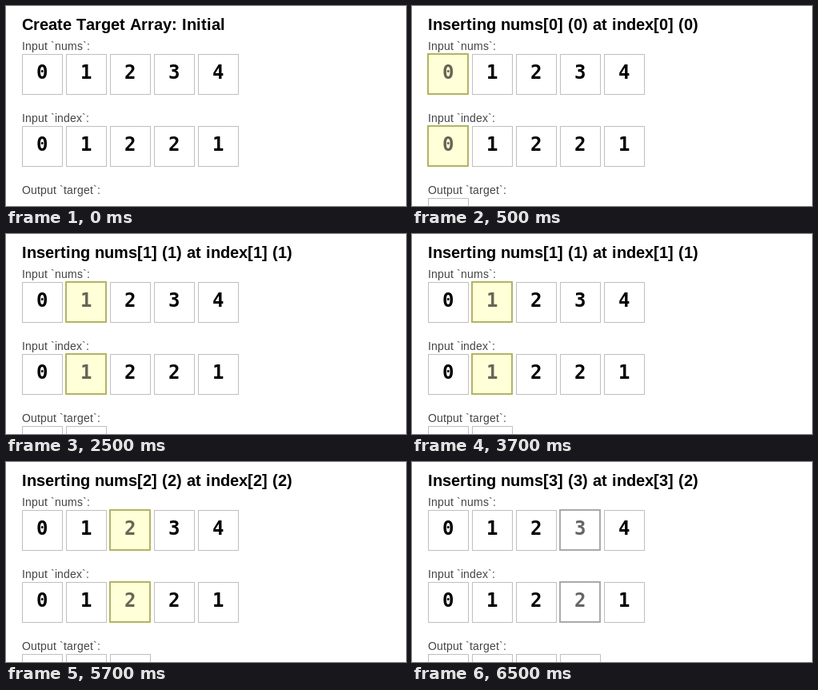
An HTML page with a canvas that plays this animation: 500 by 250 pixels, repeating every 8000 ms.

```html
<!DOCTYPE html>
<html lang="en">
<head>
<meta charset="utf-8">
<title>Create Target Array</title>
<style>
html, body { margin: 0; width: 100%; height: 100%; overflow: hidden; background: #fff; }
canvas { display: block; }
</style>
</head>
<body>
<canvas id="stage" width="500" height="250"></canvas>
<script>
const ctx = document.getElementById('stage').getContext('2d');
const SANS = '"Liberation Sans", Arial, sans-serif';
const MONO = '"DejaVu Sans Mono", monospace';
const LOOP = 8000, FIRST = 500, STEP = 2000;
const LEFT = 20, SIZE = 50, PITCH = 55;
const nums = [0, 1, 2, 3, 4];
const index = [0, 1, 2, 2, 1];

// Text on whole-pixel advances
function text(str, x, y, font, color) {
  ctx.font = font;
  ctx.fillStyle = color;
  for (const ch of str) {
    ctx.fillText(ch, x, y);
    x += Math.round(ctx.measureText(ch).width);
  }
}

function frame(x, y, size, line, color) {
  ctx.strokeStyle = color;
  ctx.lineWidth = line;
  ctx.strokeRect(x + line / 2, y + line / 2, size - line, size - line);
}

function cell(value, i, y, active, tinted) {
  const x = LEFT + i * PITCH;
  if (active) {
    ctx.fillStyle = tinted ? '#ffffd8' : '#fff';
    ctx.fillRect(x - 1, y - 1, SIZE + 2, SIZE + 2);
    frame(x - 1, y - 1, SIZE + 2, 2, tinted ? '#b4b464' : '#aaa');
  } else {
    frame(x, y, SIZE + 1, 1, '#c0c0c0');
  }
  const color = !active ? '#000' : tinted ? '#666656' : '#666';
  text(String(value), x + 18, y + 31, 'bold 24px ' + MONO, color);
}

function row(label, values, y, step) {
  text(label, LEFT, y - 5, '14px ' + SANS, '#444');
  values.forEach((v, i) => cell(v, i, y, i === step, step < 3));
}

function insertUpTo(step) {
  const target = [];
  for (let i = 0; i <= step; i++) target.splice(index[i], 0, nums[i]);
  return target;
}

function draw(step) {
  ctx.fillStyle = '#fff';
  ctx.fillRect(0, 0, 500, 250);
  const title = step < 0
    ? 'Create Target Array: Initial'
    : `Inserting nums[${step}] (${nums[step]}) at index[${step}] (${index[step]})`;
  text(title, LEFT, 30, 'bold 20px ' + SANS, '#000');
  row('Input `nums`:', nums, 60, step);
  row('Input `index`:', index, 150, step);
  row('Output `target`:', insertUpTo(step), 240, -1);
}

const start = performance.now();
function tick() {
  const t = (performance.now() - start) % LOOP;
  draw(t < FIRST ? -1 : Math.floor((t - FIRST) / STEP));
  requestAnimationFrame(tick);
}
tick();
</script>
</body>
</html>
```
